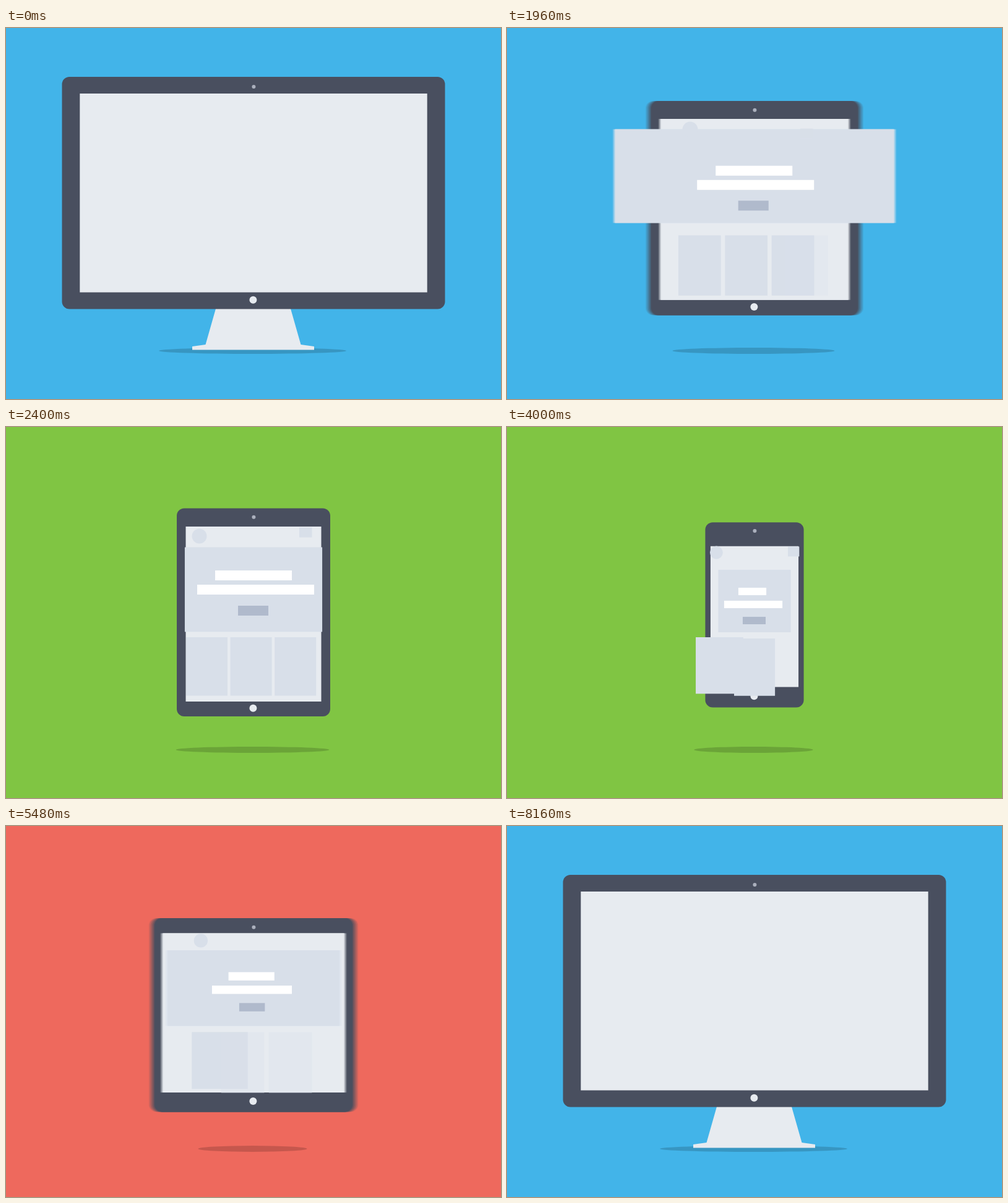
These frames come from a looping animation (800 by 600 pixels, 8.66 s). An HTML page with a canvas:

```html
<!DOCTYPE html>
<html lang="en">
<head>
<meta charset="utf-8">
<title>Responsive layout</title>
<style>
  html, body { margin: 0; width: 100%; height: 100%; overflow: hidden; background: #42b4e9; }
  canvas { display: block; width: 800px; height: 600px; }
</style>
</head>
<body>
<canvas id="stage" width="800" height="600"></canvas>
<script>
const ctx = document.getElementById('stage').getContext('2d');
const LOOP = 8660, STEP = 40, CENTER = 400;
const TO_TABLET = 1600, TO_PHONE = 3760, TO_DESKTOP = 5320, GROW = 354;
const DARK = '#494f5f', LIGHT = '#e7ebf0', BLOCK = '#d8dfe9', BUTTON = '#b0bacc', WHITE = '#fff';
const BLUE = [66, 180, 233], GREEN = [128, 197, 67], RED = [238, 105, 93];

// Spans are [top, bottom]; text bars are [left, top, width, height].
const desktop = {
  body: 309.5, bodySpan: [79, 454.5], screen: 280.7, span: [106, 427.5], shadow: 151.5,
  badge: [248, 128, 14], hero: 280.7, heroSpan: [149.5, 308],
  title: [335, 196, 124, 16], subtitle: [302, 219, 189, 16], button: [370, 251, 49, 16],
  slot: i => [236 + 86.4 * i, 74, 322, 427.5]
};
const tablet = {
  body: 124, bodySpan: [131.5, 468], screen: 109.5, span: [161, 444], shadow: 124,
  badge: [312.5, 176.5, 12], hero: 111, heroSpan: [194.5, 331.3],
  title: [338, 232, 124, 16], subtitle: [309, 255, 189, 16], button: [375, 289, 49, 16],
  slot: i => [291 + 71.6 * Math.min(i, 2), 67, 340, 434.5], menu: [474, 162.5, 20.5, 16]
};
const phone = {
  body: 79.5, bodySpan: [190, 467], screen: 71, span: [213, 433], shadow: 88,
  badge: [354, 219, 9.5], hero: 58.5, heroSpan: [231, 332],
  title: [374, 260, 45, 12], subtitle: [351, 281, 94, 12], button: [381, 307, 37, 12],
  card: [338, 100, 340, 424], pile: [367, 66, 342, 434.5], menu: [442, 212, 17, 16]
};

const easeOut = u => 1 - (1 - u) ** 3;
const easeInOut = u => u < .5 ? 4 * u ** 3 : 1 - 4 * (1 - u) ** 3;
const progress = (t, start, length, ease = easeInOut) =>
  ease(Math.max(0, Math.min(1, (t - start) / length)));
const mix = (a, b, u) => Array.isArray(a) ? a.map((v, i) => mix(v, b[i], u)) : a + (b - a) * u;

// Carries one property through the three devices; slower parts take a longer pace.
function blend(t, key, pace = 260, firstPace = 600, back = TO_DESKTOP) {
  let value = mix(desktop[key], tablet[key], progress(t, TO_TABLET, firstPace));
  value = mix(value, phone[key], progress(t, TO_PHONE, pace));
  return mix(value, desktop[key], progress(t, back, GROW));
}

function rect(x, y, w, h, fill, alpha = 1) {
  ctx.globalAlpha = alpha;
  ctx.fillStyle = fill;
  ctx.fillRect(x, y, w, h);
  ctx.globalAlpha = 1;
}

function oval(x, y, rx, ry, fill) {
  ctx.fillStyle = fill;
  ctx.beginPath();
  ctx.ellipse(x, y, rx, ry, 0, 0, Math.PI * 2);
  ctx.fill();
}

// A centred box whose left and right edges smear by the given blur.
function softBox(half, [top, bottom], fill, blur, radius = 0) {
  const layers = blur > .4 ? 8 : 1;
  ctx.fillStyle = fill;
  for (let k = 0; k < layers; k++) {
    const h = half + (layers > 1 ? blur * (1 - 2 * k / (layers - 1)) : 0);
    ctx.globalAlpha = 1 / (layers - k);
    ctx.beginPath();
    ctx.roundRect(CENTER - h, top, 2 * h, bottom - top, radius);
    ctx.fill();
  }
  ctx.globalAlpha = 1;
}

function bar([x, y, w, h], scale, fill, alpha) {
  rect(x + w * (1 - scale) / 2, y, w * scale, h, fill, alpha);
}

function drawStand(t) {
  const height = 1 - progress(t, TO_TABLET, 200) + progress(t, 5680, 240, easeOut);
  if (height <= 0) return;
  ctx.save();
  ctx.translate(399.5, 454);
  ctx.scale(1, height);
  ctx.fillStyle = LIGHT;
  ctx.beginPath();
  const side = [[60.5, 0], [77, 58], [98.5, 61], [98.5, 66.5]];
  side.forEach(([x, y]) => ctx.lineTo(x, y));
  side.reverse().forEach(([x, y]) => ctx.lineTo(-x, y));
  ctx.fill();
  ctx.restore();
}

function drawBurst(cx, cy, t) {
  const u = (t - 2040) / 240;
  if (u <= 0 || u >= 1) return;
  const r = 88.4 * easeOut(u) - 6.5;
  ctx.strokeStyle = 'rgba(255,255,255,.75)';
  ctx.lineWidth = 1;
  ctx.beginPath();
  for (let i = 0; i < 5; i++) {
    const a = (i * 72 - 90) * Math.PI / 180, c = Math.cos(a), s = Math.sin(a);
    ctx.moveTo(cx + c * (r - 2.5), cy + s * (r - 2.5));
    ctx.lineTo(cx + c * (r + 2.5), cy + s * (r + 2.5));
  }
  ctx.stroke();
}

// Extra cards pile up on the phone and return from their tablet slots.
function cardPose(i, t) {
  const grow = progress(t, TO_DESKTOP, GROW);
  const first = mix(desktop.slot(i), tablet.slot(i), progress(t, TO_TABLET, 600));
  if (i === 0) {
    const shrunk = mix(first, phone.card, progress(t, TO_PHONE, 570));
    return [mix(shrunk, desktop.slot(0), grow), 1];
  }
  if (t > TO_DESKTOP) {
    const alpha = progress(t, TO_DESKTOP + (i > 2 ? 160 : 0), GROW);
    return [mix(tablet.slot(i), desktop.slot(i), grow), alpha];
  }
  const kept = i > 2 ? 1 - progress(t, TO_TABLET, 600) : 1;
  return [mix(first, phone.pile, progress(t, TO_PHONE, 260)), kept * (1 - progress(t, 4000, 160))];
}

function drawPage(t, screen, span, blur) {
  const shown = (start, leave) => progress(t, start, 240, easeOut) * (1 - progress(t, leave, 240));
  ctx.save();
  if (t < 900 || t > 7000) {
    ctx.beginPath();
    ctx.rect(CENTER - screen, span[0], 2 * screen, span[1] - span[0]);
    ctx.clip();
  }

  const hero = blend(t, 'hero', 260, 840), heroSpan = blend(t, 'heroSpan', 260, 840);
  const wipe = progress(t, 80, 130, easeOut), fade = 1 - progress(t, 7160, 320);
  if (blur > .4) softBox(hero, heroSpan, BLOCK, blur / 2);
  else rect(CENTER - hero, heroSpan[0], 2 * hero * wipe, heroSpan[1] - heroSpan[0], BLOCK, fade);

  const [bx, by, br] = blend(t, 'badge', 440), pop = shown(480, 7400);
  oval(bx, by, br * pop, br * pop, BLOCK);

  const wide = 1 - progress(t, TO_TABLET, 160) + progress(t, 5600, 240);
  [41, 65, 41].forEach((w, i) =>
    bar([434.7 + 61.5 * i - w / 2, 119, w, 16], shown(520 + i * 60, 7360 + i * 60), BLOCK, wide));
  const menuAlpha = progress(t, TO_TABLET, 600) * (1 - progress(t, TO_DESKTOP, 140));
  bar(mix(tablet.menu, phone.menu, progress(t, TO_PHONE, 440)), 1, BLOCK, menuAlpha);

  bar(blend(t, 'title'), shown(200, 7160), WHITE);
  bar(blend(t, 'subtitle'), shown(260, 7160), WHITE);
  bar(blend(t, 'button'), shown(340, 7160), BUTTON);

  for (let i = 0; i < 4; i++) {
    const [[x, w, top, bottom], alpha] = cardPose(i, t);
    const drop = 108 * (1 - shown(400 + i * 70, 7240 + i * 70));
    rect(x, top + drop, w, bottom - top, BLOCK, alpha);
  }
  ctx.restore();
}

function draw(t) {
  let color = mix(BLUE, GREEN, progress(t, 2240, 160));
  color = mix(color, RED, progress(t, 4240, 160));
  color = mix(color, BLUE, progress(t, 5720, 160));
  rect(0, 0, 800, 600, `rgb(${color.map(Math.round)})`);
  oval(398.5, 522, blend(t, 'shadow', 390, 600, TO_DESKTOP + 140), 5, 'rgba(0,0,0,.17)');
  drawStand(t);

  const smear = (start, length) => Math.sqrt(Math.max(0, Math.sin(Math.PI * progress(t, start, length))));
  const blur = 5 * (smear(TO_TABLET, 840) + smear(TO_PHONE, 260) + smear(TO_DESKTOP, GROW));

  // The device hops a little while its height shrinks to the phone.
  const hop = 15 * Math.sin(Math.PI * progress(t, TO_PHONE, 440));
  const half = blend(t, 'body'), screen = blend(t, 'screen');
  const bodySpan = blend(t, 'bodySpan', 440).map(y => y - hop);
  const span = blend(t, 'span', 350).map(y => y - hop);

  softBox(half, bodySpan, DARK, blur, 12);
  oval(400.4, bodySpan[0] + 13 + half / 100, 3, 3, '#abb0bd');
  oval(399.4, mix(bodySpan[1], span[1], .55), 6, 6, LIGHT);
  softBox(screen, span, LIGHT, blur / 2);

  drawBurst(534, 141.8, t);
  drawBurst(220, 472.2, t);
  drawPage(t, screen, span, blur);
}

const begin = performance.now();
function tick() {
  const t = (performance.now() - begin) % LOOP;
  draw(Math.floor(t / STEP) * STEP);
  requestAnimationFrame(tick);
}
tick();
</script>
</body>
</html>
```
